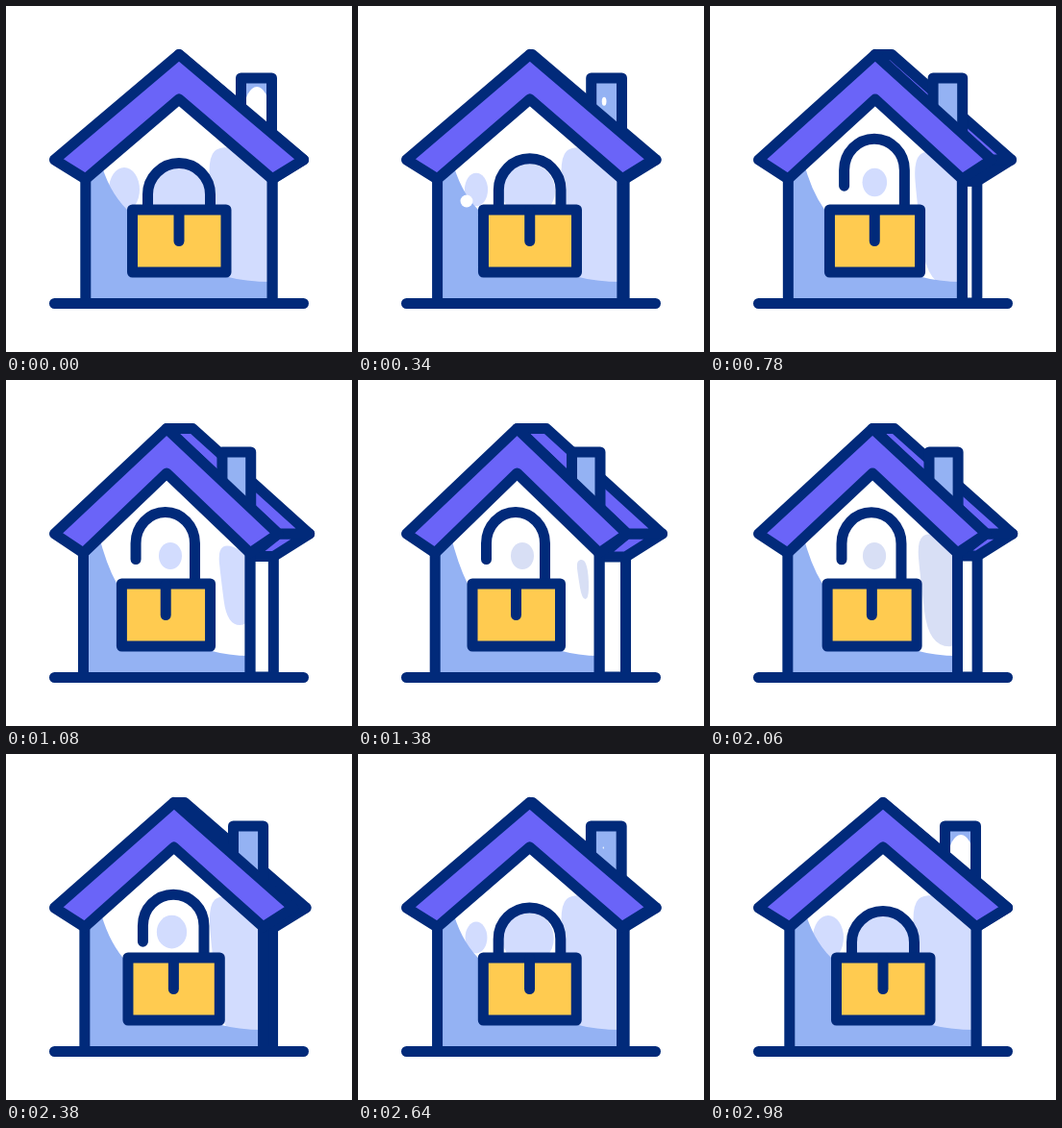
Write an HTML page with a canvas that moves like this. It is 360 px wide and 360 px high and loops after 3000 ms.

```html
<!DOCTYPE html>
<html lang="en">
<head>
<meta charset="utf-8">
<title>House lock</title>
<style>
  html, body { margin: 0; width: 100%; height: 100%; overflow: hidden; background: #fff; }
  canvas { display: block; width: 360px; height: 360px; }
</style>
</head>
<body>
<canvas id="stage" width="360" height="360"></canvas>
<script>
const ctx = document.getElementById("stage").getContext("2d");
const LOOP = 3000;
const NAVY = "#012a7a", PURPLE = "#6a64f8", YELLOW = "#ffcb50", BLUE = "#94b2f3", WHITE = "#fff";
const LAVENDER = [210, 220, 254], GREY = [224, 226, 235];

// Outline of the wall's sheen: full panel, and the streak it shrinks to
const PANEL = [[210, 158], [224, 144], [285, 155], [285, 300], [225, 300], [214, 205]];
const STREAK = [[227, 188], [236, 186], [240, 202], [240, 228], [233, 228], [229, 204]];

const mix = (a, b, k) => a + (b - a) * k;
const mixAll = (a, b, k) => a.map((v, i) => mix(v, b[i], k));
const clamp = v => Math.min(1, Math.max(0, v));
const bump = (t, peak, width) => clamp(1 - Math.abs(t - peak) / width);

function smooth(s) {
  s = clamp(s);
  return s * s * (3 - 2 * s);
}

function cubic(s) {
  s = clamp(s);
  return s < 0.5 ? 4 * s ** 3 : 1 - 4 * (1 - s) ** 3;
}

function trace(points) {
  ctx.beginPath();
  points.forEach(([x, y]) => ctx.lineTo(x, y));
}

function line(...points) {
  trace(points);
  ctx.stroke();
}

function shape(points, fill) {
  trace(points);
  ctx.closePath();
  ctx.fillStyle = fill;
  ctx.fill();
  ctx.stroke();
}

function spot(x, y, rx, ry, fill) {
  ctx.beginPath();
  ctx.ellipse(x, y, rx, ry, 0, 0, 2 * Math.PI);
  ctx.fillStyle = fill;
  ctx.fill();
}

function blob(points, fill) {
  const next = i => points[(i + 1) % points.length];
  const mid = i => mixAll(points[i], next(i), 0.5);
  ctx.beginPath();
  ctx.moveTo(...mid(points.length - 1));
  points.forEach((pt, i) => ctx.quadraticCurveTo(...pt, ...mid(i)));
  ctx.fillStyle = fill;
  ctx.fill();
}

function drawSide(g) {
  shape([[g.right, 182], [g.back, 182], [g.back, 309], [g.right, 309]], WHITE);
  shape([[g.tip, 160], [g.backTip, 160], [g.back, g.eave], [g.right, g.eave]], PURPLE);
  shape([[g.apex, 50.5], [g.backApex, 50.5], [g.backTip, 160], [g.tip, 160]], PURPLE);
}

function drawChimney(g, p) {
  const l = mix(244.5, 222.5, p), r = mix(276.5, 252, p);
  const roofY = x => mix(50.5, 160, (x - g.apex) / (g.tip - g.apex));
  const body = [[l, roofY(l)], [l, 75], [r, 75], [r, roofY(r)]];
  const glint = clamp(1 - 10 * p);
  ctx.save();
  trace(body);
  ctx.clip();
  ctx.fillStyle = BLUE;
  ctx.fill();
  spot(mix(255, 261, glint), mix(97, 109, glint), 13 * glint, 25 * glint, WHITE);
  ctx.restore();
  line(...body);
}

function drawSheen(p, t) {
  const pale = `rgb(${mixAll(LAVENDER, GREY, bump(t, 1720, 620)).map(Math.round)})`;
  const full = (1 - p) ** 4;
  const side = clamp(1 - 3 * p);
  blob(PANEL.map((pt, i) => mixAll(pt, STREAK[i], p ** 4)), pale);
  spot(mix(171, 180, full), mix(183, 196, full), mix(12, 34, full), mix(14, 34, full), pale);
  spot(123, 191, 16 * side, 23 * side, pale);
}

function drawBase(g, p) {
  const boxL = mix(126, 114, p), boxR = mix(235, 216, p);
  ctx.beginPath();
  ctx.moveTo(g.left, 309);
  ctx.lineTo(g.left, 160);
  ctx.lineTo(mix(98, 96, p), 160);
  ctx.quadraticCurveTo(mix(106, 104, p), 192, boxL, 212);
  ctx.lineTo(boxL + 50, 270);
  ctx.lineTo(boxR - 8, 281);
  ctx.quadraticCurveTo(boxR + 14, 287, g.right, 287);
  ctx.lineTo(g.right, 309);
  ctx.fillStyle = BLUE;
  ctx.fill();
}

function drawFront(g, p, t) {
  ctx.save();
  trace([[g.apex, 97], [g.right, 180], [g.right, 309], [g.left, 309], [g.left, 180]]);
  ctx.clip();
  ctx.fillStyle = WHITE;
  ctx.fill();
  drawSheen(p, t);
  drawBase(g, p);
  const dot = 6.5 * bump(t, 340, 200);
  spot(113, 203, dot, dot, WHITE);
  ctx.restore();

  line([g.left, 180], [g.left, 309]);
  line([g.right, 180], [g.right, 309]);
  shape([[50.5, 160], [g.apex, 50.5], [g.tip, 160], [g.right, 180], [g.apex, 97], [g.left, 180]], PURPLE);
}

function drawLock(p, lift) {
  const l = mix(147.5, 133.5, p), r = mix(212.5, 194.5, p);
  const cy = 196 - lift, rx = (r - l) / 2;
  ctx.beginPath();
  ctx.moveTo(l, 212.5 - lift);
  ctx.lineTo(l, cy);
  ctx.ellipse(l + rx, cy, rx, 32.5, 0, Math.PI, 2 * Math.PI);
  ctx.lineTo(r, 212);
  ctx.stroke();

  const x0 = mix(131.5, 119, p), x1 = mix(229, 210.5, p), key = mix(180, 164.5, p);
  shape([[x0, 212], [x1, 212], [x1, 277], [x0, 277]], YELLOW);
  line([key, 213], [key, 244.5]);
}

function draw(t) {
  const p = smooth((Math.min(t, LOOP - t) - 130) / 1200);
  const lift = 26 * cubic(t < LOOP / 2 ? t / 960 : (LOOP - t) / 1100);
  const g = {
    left: mix(82.8, 80.2, p), right: mix(277, 251, p), back: mix(277, 278.5, p),
    apex: mix(180, 165.5, p), backApex: mix(180, 196, p),
    tip: mix(309.5, 280, p), backTip: mix(309.5, 316.5, p), eave: mix(180, 184, p)
  };
  ctx.fillStyle = WHITE;
  ctx.fillRect(0, 0, 360, 360);
  ctx.strokeStyle = NAVY;
  ctx.lineWidth = 11;
  ctx.lineCap = ctx.lineJoin = "round";
  drawSide(g);
  drawChimney(g, p);
  drawFront(g, p, t);
  drawLock(p, lift);
  line([50.5, 309.5], [309.5, 309.5]);
}

const start = performance.now();
function tick() {
  draw((performance.now() - start) % LOOP);
  requestAnimationFrame(tick);
}
tick();
</script>
</body>
</html>
```
